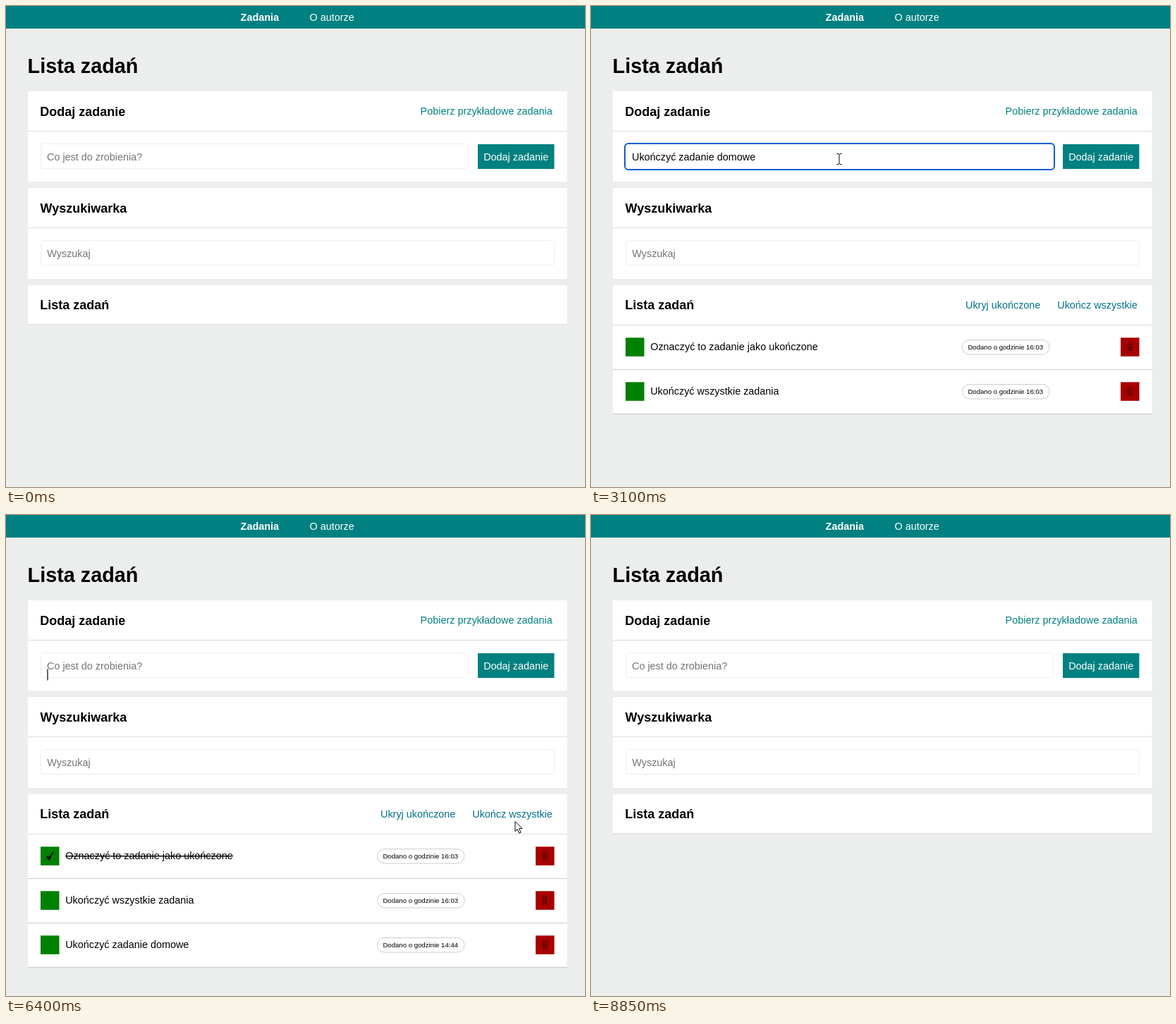
These frames come from a looping animation (821 by 682 pixels, 8.9 s). An HTML page:

```html
<!DOCTYPE html>
<html lang="pl">
<head>
<meta charset="utf-8">
<title>Lista zadań</title>
<style>
html, body { margin: 0; width: 100%; height: 100%; overflow: hidden; background: #eceeed; }
svg { display: block; width: 821px; height: 682px; }
text { font-family: "Liberation Sans", Arial, sans-serif; font-size: 14.4px; white-space: pre; }
.h1 { font-size: 28.8px; font-weight: bold; }
.h2 { font-size: 18px; font-weight: bold; }
.small { font-size: 9.6px; }
.bold { font-weight: bold; }
.end { text-anchor: end; }
.mid { text-anchor: middle; }
</style>
</head>
<body>
<svg id="stage" viewBox="0 0 821 682"></svg>
<script>
const LOOP = 8900, STEP = 50;
const TEAL = '#008080', LINK = '#00708a', GREY = '#808080', HINT = '#757575';
const stage = document.getElementById('stage');

function add(parent, tag, attrs = {}, content) {
  const el = document.createElementNS('http://www.w3.org/2000/svg', tag);
  set(el, attrs);
  if (content !== undefined) el.textContent = content;
  parent.append(el);
  return el;
}
function set(el, attrs) {
  for (const name in attrs) el.setAttribute(name, attrs[name]);
}
const show = (el, on) => set(el, { visibility: on ? 'visible' : 'hidden' });
const rect = (parent, x, y, width, height, fill, more) =>
  add(parent, 'rect', { x, y, width, height, fill, ...more });
const label = (parent, x, y, content, fill = '#000', cls = '') =>
  add(parent, 'text', { x, y, fill, class: cls }, content);
const field = (y, width) =>
  rect(stage, 49.5, y, width, 35, '#fff', { rx: 4, stroke: '#eceeed' });

// Page
rect(stage, 0, 0, 821, 682, '#eceeed');
rect(stage, 0, 0, 821, 32, TEAL);
label(stage, 332.6, 20.5, 'Zadania', '#fff', 'bold');
label(stage, 430.5, 20.5, 'O autorze', '#fff');
label(stage, 30.6, 95, 'Lista zadań', '#000', 'h1');

rect(stage, 31, 121, 764.5, 128, '#fff');
rect(stage, 31, 177, 764.5, 1, '#ddd');
label(stage, 48.3, 156, 'Dodaj zadanie', '#000', 'h2');
const fetchLink = label(stage, 774.8, 154, '', TEAL, 'end');
field(195.5, 606);
const focusRing = rect(stage, 48, 195, 609, 37, '#fff', { rx: 5, stroke: '#0b5ed0', 'stroke-width': 2 });
const entry = label(stage, 58, 219, '');
const button = add(stage, 'g');
const buttonBox = rect(button, 669, 196, 108.4, 35, TEAL);
label(button, 723.2, 219, 'Dodaj zadanie', '#fff', 'mid');

rect(stage, 31, 258, 764.5, 129, '#fff');
rect(stage, 31, 314, 764.5, 1, '#ddd');
label(stage, 48.6, 293, 'Wyszukiwarka', '#000', 'h2');
field(332.5, 728);
label(stage, 58.3, 356, 'Wyszukaj', HINT);

const listPanel = rect(stage, 31, 396, 764.5, 55.5, '#fff');
const listRule = rect(stage, 31, 451, 764.5, 1, '#ddd');
label(stage, 48.3, 430, 'Lista zadań', '#000', 'h2');
const hideLink = label(stage, 637.4, 429, 'Ukryj ukończone', LINK, 'end');
const finishLink = label(stage, 774.8, 429, 'Ukończ wszystkie', LINK, 'end');

// Tasks
const NEW_TASK = 'Ukończyć zadanie domowe';
const tasks = [
  { title: 'Oznaczyć to zadanie jako ukończone', hour: '16:03', from: 1800, done: 5400, to: 7700 },
  { title: 'Ukończyć wszystkie zadania', hour: '16:03', from: 1800, done: 6650, to: 8100 },
  { title: NEW_TASK, hour: '14:44', from: 4050, done: 6650, to: 8450 }
];
for (const task of tasks) {
  const g = task.group = add(stage, 'g');
  rect(g, 31, 515, 764.5, 1, '#ccc');
  task.box = rect(g, 49, 470.3, 26.5, 26.5, '#008000');
  task.check = add(g, 'path', {
    d: 'M57 484 L59.5 482.8 L61 485.6 Q63.5 480 67.5 477 L68 477.8 Q64.5 482 62 489 L60 489.5 Z'
  });
  task.text = label(g, 84.2, 488, task.title);
  rect(g, 526.5, 473.5, 123.5, 20.5, '#fff', { rx: 10.25, stroke: '#ccc' });
  label(g, 534.4, 487, 'Dodano o godzinie ' + task.hour, '#000', 'small');
  task.bin = rect(g, 751, 470.3, 26.5, 26.5, '#a80000');
  add(g, 'path', {
    d: 'M760 479.5h8M762.5 478h3M761 480.5l.7 8h4.6l.7-8M763 481.5v6M765 481.5v6',
    fill: 'none', stroke: '#4a0808', 'stroke-width': 1
  });
}

// Carets, click marker and pointers
const caret = rect(stage, 0, 0, 1.2, 16, '#000');
const marker = add(stage, 'circle', { r: 10.5, fill: '#f0960a', opacity: 0.88 });
const outline = { fill: '#fff', stroke: '#000', 'stroke-linejoin': 'round' };
const pointers = {
  arrow: add(stage, 'path', { d: 'M.5 .5V14.5L3.7 11.5L6.2 17.2L8.6 16.2L6.2 10.6H10.6Z', ...outline }),
  hand: add(stage, 'path', {
    d: 'M-1.5 12V1.5Q0-.8 1.5 1.5V7Q3.2 5.6 4.3 7.6Q6 6.4 7 8.4Q9.3 7.6 9.5 10V15Q9.2 18 7.5 19.5V21.5H-.5V20L-5 14Q-5.7 11 -3.5 11Z' +
       'M1.5 7v4M4.3 7.6v4M7 8.4v4', ...outline
  }),
  beam: add(stage, 'path', {
    d: 'M-3.5-7.5h2.5L0-6.5L1-7.5h2.5M0-6.5V6.5M-3.5 7.5h2.5L0 6.5L1 7.5h2.5', fill: 'none', stroke: '#000'
  })
};

const path = [
  [50, 34, 451], [250, 34, 451], [800, 673, 142], [1850, 673, 142], [2500, 352, 217],
  [3250, 352, 217], [3900, 718, 215], [4450, 718, 215], [5085, 64, 481], [5250, 64, 488],
  [5600, 64, 488], [6451, 728.3, 433.4], [6900, 728.3, 433.4], [7450, 767.5, 478],
  [8500, 767.5, 478], [8800, 778, 690]
];
const clicks = [100, 1000, 2700, 4000, 5350, 6600, 7600, 8000, 8350];
const handTimes = [[700, 1050], [3800, 4530], [5060, 5650], [6450, 6650], [7400, 8450]];
const caretTimes = [
  { from: 150, to: 1800, x: 30.8, y: 453 },
  { from: 1800, to: 2700, x: 49, y: 470 },
  { from: 5400, to: 8700, x: 58.4, y: 218.5 }
];

const within = (t, from, to) => t >= from && t < to;
const clamp = v => Math.max(0, Math.min(1, v));
const smooth = v => { v = clamp(v); return v * v * (3 - 2 * v); };
const blink = age => age % 1000 < 500;

function pointerAt(t) {
  const i = Math.max(1, path.findIndex(key => key[0] > t));
  const [t0, x0, y0] = path[i - 1], [t1, x1, y1] = path[i];
  const k = smooth((t - t0) / (t1 - t0));
  return [x0 + (x1 - x0) * k, y0 + (y1 - y0) * k];
}

function drawForm(t) {
  const loading = within(t, 1050, 1850);
  fetchLink.textContent = loading ? 'Ładowanie...' : 'Pobierz przykładowe zadania';
  set(fetchLink, { fill: loading ? GREY : within(t, 700, 1050) ? '#00a0a0' : TEAL });

  show(focusRing, within(t, 2750, 5350));
  const typed = within(t, 2750, 4050) ? NEW_TASK.slice(0, Math.floor((t - 2750) / 14)) : '';
  entry.textContent = typed || 'Co jest do zrobienia?';
  set(entry, { fill: typed ? '#000' : HINT });

  const hover = smooth((t - 3800) / 450) * (1 - smooth((t - 4530) / 500));
  set(button, { transform: `translate(723.2 213.5) scale(${1 + 0.1 * hover}) translate(-723.2 -213.5)` });
  set(buttonBox, { fill: `rgb(0,${128 + 22 * hover},${128 + 22 * hover})` });
  return typed;
}

function drawList(t) {
  const live = tasks.filter(task => within(t, task.from, task.to));
  const filled = live.length > 0;
  set(listPanel, { height: 55.5 + 63 * live.length });
  set(listRule, { y: filled ? 452 : 451 });
  show(hideLink, filled);
  show(finishLink, filled);
  set(finishLink, { fill: t >= 6650 ? GREY : within(t, 6450, 6650) ? '#0090ae' : LINK });
  for (const task of tasks) {
    const row = live.indexOf(task), done = t >= task.done;
    set(task.group, { transform: `translate(0 ${63 * row})`, display: row < 0 ? 'none' : 'inline' });
    set(task.check, { display: done ? 'inline' : 'none' });
    set(task.text, { 'text-decoration': done ? 'line-through' : 'none' });
    set(task.box, { fill: row === 0 && within(t, 5060, 5650) ? '#00a000' : '#008000' });
    set(task.bin, { fill: row === 0 && within(t, 7400, 8450) ? '#e81c20' : '#a80000' });
  }
}

function drawCaret(t, typed) {
  let spot = caretTimes.find(c => within(t, c.from, c.to));
  let on = spot && blink(t - spot.from);
  if (within(t, 2750, 5350)) {
    spot = { x: 58 + (typed ? entry.getComputedTextLength() : 0), y: 206 };
    on = blink(t < 4050 ? t - 2550 : t - 4000);
  }
  show(caret, on);
  if (on) set(caret, { x: spot.x, y: spot.y });
}

function drawPointer(t) {
  const visible = within(t, 50, 8800);
  const kind = handTimes.some(([a, b]) => within(t, a, b)) ? 'hand' : within(t, 2400, 3700) ? 'beam' : 'arrow';
  const [x, y] = visible ? pointerAt(t) : [0, 0];
  for (const name in pointers) {
    show(pointers[name], visible && name === kind);
    set(pointers[name], { transform: `translate(${x} ${y})` });
  }
  show(marker, clicks.some(c => within(t, c, c + 150)));
  set(marker, { cx: x, cy: y + 2 });
}

function draw(t) {
  const typed = drawForm(t);
  drawList(t);
  drawCaret(t, typed);
  drawPointer(t);
}

const start = performance.now();
function tick() {
  const t = (performance.now() - start) % LOOP;
  draw(Math.floor(t / STEP) * STEP);
  requestAnimationFrame(tick);
}
tick();
</script>
</body>
</html>
```
